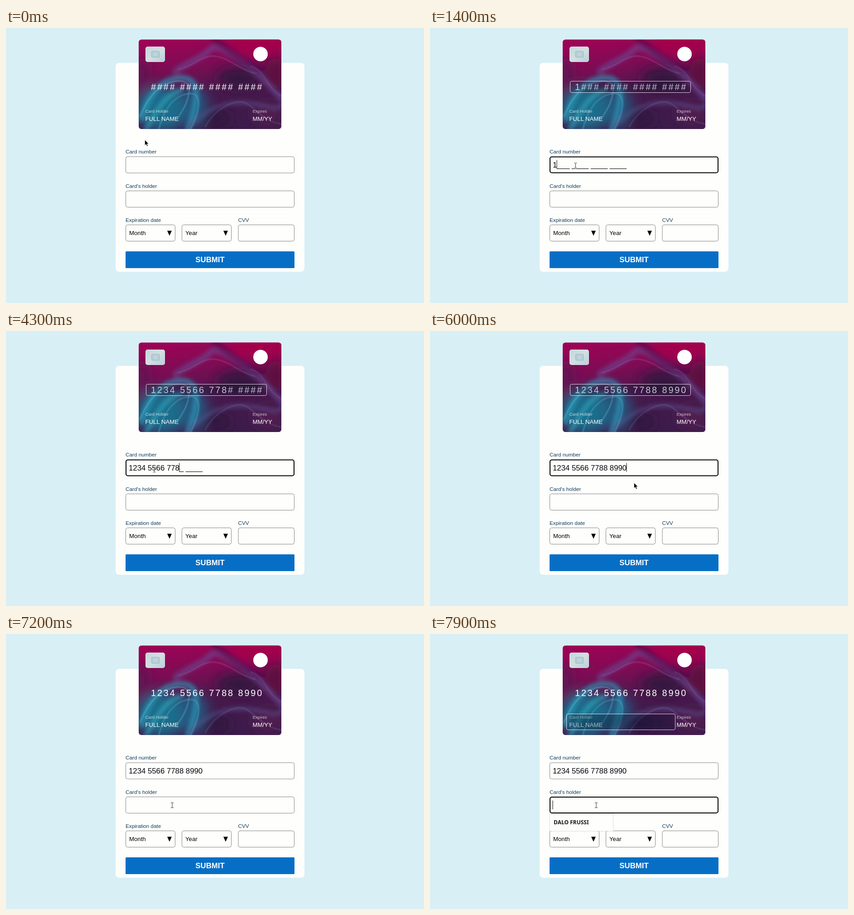
An HTML page for the animation above (8000 ms loop, 923x607 px).

```html
<!DOCTYPE html>
<html lang="en">
<head>
<meta charset="utf-8">
<title>Card form</title>
<style>
  html, body { margin: 0; width: 100%; height: 100%; overflow: hidden; background: #d8eff6; }
  svg { position: absolute; left: 0; top: 0; display: block; }
  text { font-family: "Liberation Sans", Arial, sans-serif; white-space: pre; }
  .label { font-size: 11.73px; fill: #113a5c; }
  .value { font-size: 16.78px; fill: #05050c; }
  .choice { font-size: 13.2px; fill: #000; }
  .small { font-size: 9.52px; fill: #fff; opacity: .72; }
  .big { font-size: 13.2px; fill: #fff; }
  .digits { font-size: 19.8px; letter-spacing: 2.93px; fill: #fff; }
  .field { fill: #fefffc; stroke: #858585; stroke-width: 1; }
  .field.on { stroke: #000; stroke-width: 2; }
  .smoke { fill: none; stroke-linecap: round; }
  #focus { position: absolute; box-sizing: border-box; overflow: hidden; opacity: 0;
    border: 1px solid rgba(255,255,255,.82); border-radius: 4px; }
  #focus::after { content: ""; position: absolute; inset: 0; background: #08142f; opacity: .5; filter: blur(18px); }
</style>
</head>
<body>
<svg width="923" height="607" viewBox="0 0 923 607">
  <defs>
    <linearGradient id="base" x1=".35" y1="0" x2=".55" y2="1">
      <stop offset="0" stop-color="#9b0455"/>
      <stop offset=".28" stop-color="#7d0c54"/>
      <stop offset=".6" stop-color="#481a4c"/>
      <stop offset="1" stop-color="#3c1c4b"/>
    </linearGradient>
    <linearGradient id="chip" x1="0" y1="0" x2="1" y2="1">
      <stop offset="0" stop-color="#bcd3dd"/>
      <stop offset=".5" stop-color="#cfdfe5"/>
      <stop offset="1" stop-color="#a9cbdc"/>
    </linearGradient>
    <pattern id="weave" width="4" height="4" patternUnits="userSpaceOnUse">
      <path d="M0 0L4 4M4 0L0 4" stroke="#e6e2d0" stroke-width=".6" opacity=".6"/>
    </pattern>
    <filter id="soft" x="-60%" y="-60%" width="220%" height="220%"><feGaussianBlur stdDeviation="13"/></filter>
    <filter id="haze" x="-60%" y="-60%" width="220%" height="220%"><feGaussianBlur stdDeviation="4"/></filter>
    <filter id="wisp" x="-60%" y="-60%" width="220%" height="220%"><feGaussianBlur stdDeviation="1.3"/></filter>
    <clipPath id="cardShape"><rect x="293" y="25.5" width="315" height="197.5" rx="6"/></clipPath>
  </defs>

  <rect x="242" y="77" width="417" height="461" rx="8" fill="#fefffc"/>

  <g clip-path="url(#cardShape)">
    <rect x="293" y="25" width="315" height="199" fill="url(#base)"/>
    <g filter="url(#soft)">
      <ellipse cx="555" cy="35" rx="70" ry="26" fill="#a4004c"/>
      <ellipse cx="597" cy="100" rx="24" ry="34" fill="#5e0d40"/>
      <ellipse cx="345" cy="178" rx="58" ry="48" fill="#1c6d8c"/>
      <ellipse cx="415" cy="175" rx="30" ry="45" fill="#28577f"/>
      <ellipse cx="515" cy="112" rx="50" ry="24" fill="#34183f"/>
      <ellipse cx="465" cy="200" rx="32" ry="24" fill="#30173f"/>
      <ellipse cx="580" cy="190" rx="36" ry="26" fill="#511c50"/>
      <ellipse cx="300" cy="105" rx="16" ry="38" fill="#5d1652"/>
    </g>
    <g class="smoke" filter="url(#haze)">
      <path d="M300 200C315 145 345 112 385 110S430 150 402 222" stroke="#2a9dbb" stroke-width="13" opacity=".62"/>
      <path d="M310 222C335 180 350 148 386 138" stroke="#35b0c4" stroke-width="10" opacity=".55"/>
      <path d="M375 95C410 70 435 65 450 48S500 60 535 85S582 130 608 155" stroke="#67509a" stroke-width="14" opacity=".55"/>
      <path d="M405 215C445 180 480 160 535 166S590 185 608 170" stroke="#5b5794" stroke-width="9" opacity=".5"/>
      <path d="M460 26C490 45 520 78 560 92" stroke="#520b4b" stroke-width="16" opacity=".5"/>
    </g>
    <g class="smoke" filter="url(#wisp)">
      <path d="M296 195C318 140 350 118 382 117S410 155 378 200" stroke="#62c7d2" stroke-width="2.5" opacity=".45"/>
      <path d="M338 222C348 180 370 150 402 145S430 180 408 222" stroke="#55b2cb" stroke-width="2.5" opacity=".5"/>
      <path d="M380 92C420 82 430 60 460 62S515 92 550 100" stroke="#9c72b2" stroke-width="2" opacity=".45"/>
      <path d="M440 218C460 180 505 155 528 165S565 205 608 212" stroke="#8b78b4" stroke-width="2" opacity=".4"/>
      <path d="M540 84C575 95 572 130 608 150" stroke="#8d65a1" stroke-width="2" opacity=".45"/>
    </g>
  </g>

  <rect x="308" y="41" width="43" height="34" rx="5" fill="url(#chip)"/>
  <rect x="308" y="41" width="43" height="34" rx="5" fill="url(#weave)"/>
  <rect x="308.5" y="41.5" width="42" height="33" rx="4.5" fill="none" stroke="#d9e7ed"/>
  <rect x="321" y="51" width="18" height="14" rx="2" fill="#b3cbd4" stroke="#a3bdc8"/>
  <rect x="325.500" y="54" width="9" height="8" fill="#bfd5dc"/>
  <circle cx="562" cy="57.500" r="16" fill="#fff"/>

  <text id="cardDigits" class="digits" x="320" y="137"></text>
  <text class="small" x="307.500" y="187.300">Card Holder</text>
  <text class="big" x="307.500" y="204.800">FULL NAME</text>
  <text class="small" x="544.500" y="187.300">Expires</text>
  <text class="big" x="544.500" y="204.800">MM/YY</text>

  <text class="label" x="264" y="277">Card number</text>
  <text class="label" x="264" y="352.500">Card's holder</text>
  <text class="label" x="264" y="427.700">Expiration date</text>
  <text class="label" x="512.500" y="427.700">CVV</text>

  <rect id="numberField" class="field" rx="4"/>
  <rect id="holderField" class="field" rx="4"/>
  <rect class="field" x="264.500" y="434.500" width="109" height="36" rx="4"/>
  <rect class="field" x="388.500" y="434.500" width="109" height="36" rx="4"/>
  <rect class="field" x="513" y="434.500" width="123.500" height="36" rx="4"/>
  <text class="choice" x="272" y="457.300">Month</text>
  <text class="choice" x="396" y="457.300">Year</text>
  <path d="M356 447.500h10l-5 11zM480 447.500h10l-5 11z"/>

  <rect x="264" y="493" width="373" height="37" rx="1.500" fill="#066fc5"/>
  <text x="450.500" y="517" text-anchor="middle" font-size="16.780" font-weight="700" fill="#fff">SUBMIT</text>

  <text id="typed" class="value" x="271" y="307.500"></text>
  <rect id="caret" width="1" height="19.500"/>

  <g id="popup">
    <rect x="263" y="397" width="142.500" height="39.500" fill="#000" opacity=".05"/>
    <rect x="264" y="396.500" width="140.500" height="38.500" fill="#fefefd" stroke="#dcdedd" stroke-width=".8"/>
    <text x="273" y="419.700" style="font:600 12px 'Noto Sans','Open Sans',sans-serif" fill="#16181b">DALO FRUSSI</text>
  </g>

  <path id="arrow" d="M0 0V12L2.800 9.500L4.800 14L6.900 13L4.900 8.800H8.600Z" fill="#000" stroke="#fff" stroke-width=".7"/>
  <g id="beam" fill="none">
    <path d="M-3 -6H3M-3 6H3M0 -6V6" stroke="#fff" stroke-width="2.600" opacity=".7"/>
    <path d="M-3 -5.500H-.8L0 -4.800L.8 -5.500H3M-3 5.500H-.8L0 4.800L.8 5.500H3M0 -5V5" stroke="#333"/>
  </g>
</svg>
<div id="focus"></div>

<script>
const LOOP = 8000, TICK = 100, FADE = 350;
const NUMBER = "1234556677888990";
const DIGIT = 9.33, TEXT_X = 271;
const focusTimes = { number: [800, 6100], holder: [7300, LOOP] };
const POPUP_AT = 7400;

// time, digits entered
const typing = [[1400, 1], [1700, 3], [2200, 4], [2700, 5], [3200, 7], [3800, 8], [4100, 9],
  [4200, 10], [4300, 11], [4500, 12], [4700, 13], [5000, 14], [5200, 16]];

// time, x, y of the pointer
const path = [[0, 306.5, 247], [100, 306.5, 247], [600, 321.5, 303.5], [4000, 321.5, 303.5],
  [4300, 327.5, 306], [5500, 327.5, 306], [6000, 450.5, 335], [6700, 450.5, 335],
  [7000, 371, 373], [7100, 371, 373], [7200, 367, 378], [LOOP, 367, 378]];

const el = id => document.getElementById(id);
const show = (node, on) => node.style.display = on ? "" : "none";
const within = (t, [from, to]) => t >= from && t < to;

const box = (x, y, w, h, opacity) =>
  ({ left: x + "px", top: y + "px", width: w + "px", height: h + "px", opacity });
const wholeCard = box(293, 25.5, 315, 197.5, 0);
const numberBox = box(309, 117, 267, 26, 1);
const holderBox = box(300.5, 175.5, 241.5, 36.5, 1);
const key = (time, pose) =>
  ({ ...pose, offset: time / LOOP, easing: "cubic-bezier(.71,.03,.56,.85)" });
const [focusIn, focusOut] = focusTimes.number;
const holderIn = focusTimes.holder[0];

const highlight = el("focus").animate([
  key(0, wholeCard), key(focusIn, wholeCard), key(focusIn + FADE, numberBox),
  key(focusOut, numberBox), key(focusOut + FADE, wholeCard),
  key(holderIn, wholeCard), key(holderIn + FADE, holderBox), key(LOOP, holderBox)
], { duration: LOOP, fill: "both" });
highlight.pause();

function pointerAt(t) {
  const i = Math.max(1, path.findIndex(p => p[0] >= t));
  const [t0, x0, y0] = path[i - 1], [t1, x1, y1] = path[i];
  const k = (t - t0) / (t1 - t0);
  return [x0 + (x1 - x0) * k, y0 + (y1 - y0) * k];
}

const masked = (count, blank) =>
  NUMBER.slice(0, count).padEnd(16, blank).match(/.{4}/g).join(" ");

function setField(node, y, on) {
  const inset = on ? 1 : .5;
  node.classList.toggle("on", on);
  node.setAttribute("x", 264 + inset);
  node.setAttribute("y", y + inset);
  node.setAttribute("width", 373 - 2 * inset);
  node.setAttribute("height", 37 - 2 * inset);
}

function render(t) {
  const count = typing.reduce((n, [at, value]) => t >= at ? value : n, 0);
  const onNumber = within(t, focusTimes.number);
  const onHolder = within(t, focusTimes.holder);

  el("cardDigits").textContent = masked(count, "#");
  el("typed").textContent = count || onNumber ? masked(count, "_") : "";
  setField(el("numberField"), 283.5, onNumber);
  setField(el("holderField"), 359, onHolder);

  const gaps = Math.min(3, Math.floor(count / 4));
  const caretX = onNumber ? TEXT_X + DIGIT * (count + gaps / 2) - .8 : TEXT_X - .5;
  el("caret").setAttribute("x", caretX);
  el("caret").setAttribute("y", onNumber ? 291.5 : 367.5);
  show(el("caret"), onNumber || onHolder);
  show(el("popup"), t >= POPUP_AT);

  const [x, y] = pointerAt(t);
  const overField = within(y, [284, 320]) || within(y, [359, 396]);
  for (const id of ["arrow", "beam"]) {
    el(id).setAttribute("transform", `translate(${x} ${y})`);
    show(el(id), overField === (id === "beam"));
  }
  highlight.currentTime = t;
}

const start = performance.now();
function loop() {
  const elapsed = (performance.now() - start) % LOOP;
  render(Math.floor(elapsed / TICK) * TICK);
  requestAnimationFrame(loop);
}
loop();
</script>
</body>
</html>
```
